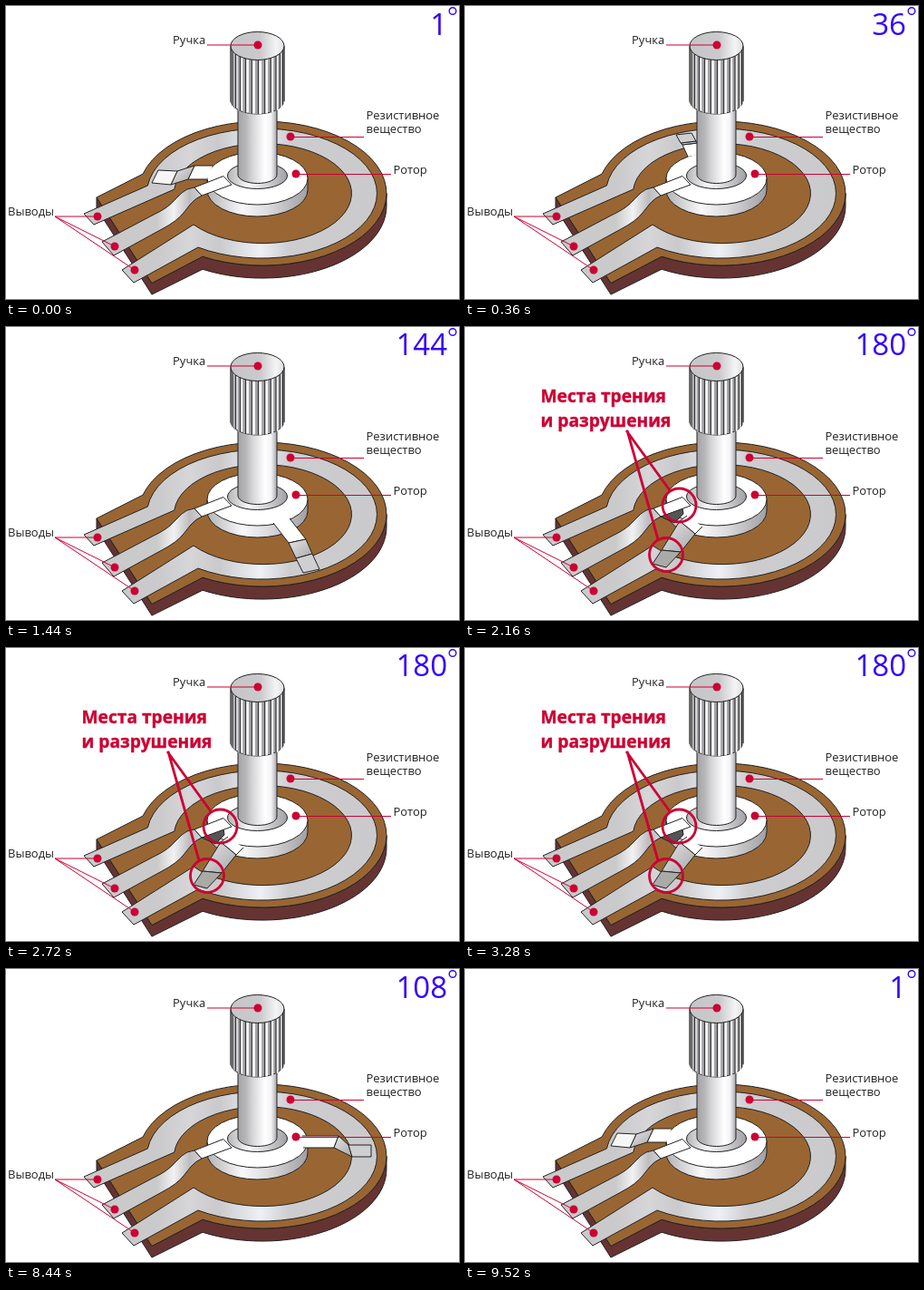
Recreate the animation shown at these times as an HTML page. Size 500 px wide and 323 px high, loop 9880 ms.

```html
<!DOCTYPE html>
<html lang="ru">
<head>
<meta charset="utf-8">
<style>
html, body { margin: 0; width: 100%; height: 100%; overflow: hidden; background: #fff; }
svg { display: block; width: 500px; height: 323px; }
text { font-family: "Open Sans", "Noto Sans", sans-serif; }
.label { font-size: 13px; fill: #222; }
.ink { stroke: #222; stroke-width: 1; stroke-linejoin: round; }
.lead { stroke: #cc0033; stroke-width: 1; fill: none; }
.dots { fill: #cc0033; }
.warn { stroke: #cc0033; stroke-width: 2.8; fill: none; }
.alert { font-size: 19.2px; font-weight: 700; fill: #cc0033; stroke: #cc0033; stroke-width: .4; }
</style>
</head>
<body>
<svg viewBox="0 0 500 323">
  <defs>
    <linearGradient id="track" gradientUnits="userSpaceOnUse" x1="86" x2="410">
      <stop offset="0" stop-color="#cacaca"/><stop offset=".25" stop-color="#cacacc"/>
      <stop offset=".36" stop-color="#d6d6d9"/><stop offset=".46" stop-color="#cacacc"/>
      <stop offset=".6" stop-color="#eef0f6"/><stop offset=".7" stop-color="#cdcdd0"/>
      <stop offset="1" stop-color="#cacacc"/>
    </linearGradient>
    <linearGradient id="shaft">
      <stop offset="0" stop-color="#a4a4a7"/><stop offset=".2" stop-color="#b6b6b9"/>
      <stop offset=".35" stop-color="#d2d2d5"/><stop offset=".55" stop-color="#ececee"/>
      <stop offset=".7" stop-color="#fff"/><stop offset=".85" stop-color="#f4f4f6"/>
      <stop offset="1" stop-color="#a8a8ac"/>
    </linearGradient>
    <linearGradient id="rim">
      <stop offset="0" stop-color="#b4b4b6"/><stop offset=".35" stop-color="#f8f8fa"/>
      <stop offset=".6" stop-color="#dcdcde"/><stop offset="1" stop-color="#a0a0a4"/>
    </linearGradient>
    <linearGradient id="cap">
      <stop offset="0" stop-color="#c6c6c9"/><stop offset=".55" stop-color="#cacacd"/>
      <stop offset=".85" stop-color="#f4f4f6"/><stop offset="1" stop-color="#e0e0e2"/>
    </linearGradient>
    <linearGradient id="slope" x2="1" y2="1">
      <stop offset="0" stop-color="#e6e6e8"/><stop offset="1" stop-color="#a8a8ab"/>
    </linearGradient>
    <linearGradient id="wiper">
      <stop offset="0" stop-color="#cacaca"/><stop offset=".55" stop-color="#cacaca"/>
      <stop offset=".72" stop-color="#f2f2f4"/><stop offset=".88" stop-color="#bcbcbf"/>
      <stop offset="1" stop-color="#d4d4d6"/>
    </linearGradient>
  </defs>

  <g class="ink">
    <path fill="#663333" d="M100,211 L161,305.5 L217,276.2 A137,79.5 0 0 0 420,206.5 V220.5 A137,79.5 0 0 1 217,290.2 L161,318 L100,223Z"/>
    <path fill="#996633" d="M100,211 L151,185.2 A137,79.5 0 1 1 217,276.2 L161,305.5Z"/>
    <path fill="url(#track)" d="M86,229 L156.4,198 A127,71.5 0 1 1 212,266 L141,305 L128,291 L207,241 A98,55 0 1 0 185.8,202 L97,241Z"/>
    <path fill="url(#rim)" d="M222,190 V203 A55.5,29 0 0 0 333,203 V190Z"/>
    <ellipse cx="277.5" cy="190" rx="55.5" ry="29" fill="#fff"/>
  </g>
  <g id="arm" class="ink">
    <path fill="#fff"/><path fill="url(#slope)"/><path/>
  </g>
  <g class="ink">
    <path fill="url(#wiper)" d="M106,260 L163,230 Q178,223 185,215 L194,206 Q199,201 208,200 L216,209 Q209,212 204,218 L196,228 Q189,237 172,246 L119,275Z"/>
    <path id="wear" fill="#555" d="M216,209 L240,199 L241,206 L231,216Z"/>
    <path fill="#fff" d="M208,200 L240,187.5 L249,197 L216,209Z"/>
    <ellipse cx="277.5" cy="187" rx="33" ry="14.5" fill="url(#rim)"/>
    <path fill="url(#shaft)" d="M256,110 V186 A21.5,9.5 0 0 0 299,186 V110Z"/>
    <path fill="url(#rim)" d="M248,44 V104 A29.5,15 0 0 0 307,104 V44Z"/>
  </g>
  <g id="flutes" fill="none"></g>
  <ellipse class="ink" cx="277.5" cy="44" rx="29.5" ry="15.5" fill="url(#cap)"/>

  <path class="lead" d="M222,43 H278 M314,144.5 H395 M320,185.5 H425 M54,232 H101 M54,232 L120,265 M54,232 L142,291"/>
  <g id="dots" class="dots"></g>
  <g class="label">
    <text x="184" y="42">Ручка</text>
    <text x="397.5" y="125">Резистивное</text>
    <text x="397.5" y="140">вещество</text>
    <text x="427.5" y="185">Ротор</text>
    <text x="2" y="231">Выводы</text>
  </g>
  <g id="alert">
    <path class="warn" d="M178,114 L226,180 M179,114 L213,234"/>
    <circle class="warn" cx="236.5" cy="196.5" r="18.5"/>
    <circle class="warn" cx="222" cy="251" r="18.5"/>
    <text class="alert" x="83.5" y="83">Места трения</text>
    <text class="alert" x="83.5" y="109.5">и разрушения</text>
  </g>
  <text id="angle" x="487" text-anchor="end" font-size="33" fill="#3300ff"></text>
  <circle cx="493" cy="5.5" r="3.8" fill="none" stroke="#3300ff" stroke-width="1.4"/>
</svg>
<script>
const LOOP = 9880, STEP = 360, BLINK = 280, LAST = 5;
const NS = "http://www.w3.org/2000/svg";
const $ = id => document.getElementById(id);

// Each arm: four points along one edge, then four along the other.
const arms = [
  "228,176 208,176 189,182 168,181 222,191 201,191 182,197 161,195",
  "246,166 240,153 238,151 233,142 264,163 257,151 255,149 250,140",
  "297,164 312,151 323,154 337,145 313,169 327,156 339,159 354,150",
  "327,184 367,184 378,194 403,194 328,197 362,197 382,207 403,207",
  "313,211 331,234 338,250 346,267 295,216 312,238 320,255 328,271",
  "245,208 237,214 217,246 207,261 262,220 254,228 238,248 222,265"
].map(s => s.split(" "));

function add(parent, tag, attrs) {
  const el = document.createElementNS(NS, tag);
  for (const k in attrs) el.setAttribute(k, attrs[k]);
  return parent.appendChild(el);
}

function drawDots() {
  for (const [cx, cy] of [[278, 43], [314, 144], [320, 185], [101, 232], [120, 265], [142, 291]])
    add($("dots"), "circle", { cx, cy, r: 4.5 });
}

function drawFlutes() {
  for (let deg = -82; deg < 90; deg += 14) {
    const a = deg * Math.PI / 180, c = Math.cos(a), x = 277.5 + 29.5 * Math.sin(a);
    const rib = (dx, stroke, w) => add($("flutes"), "path", {
      d: `M${x + dx * c},${44 + 15 * c}V${104 + 15 * c}`, stroke, "stroke-width": w
    });
    rib(-2, "#a2a2a6", 2.6 * c + .4);
    rib(2, "#fafafa", 2.6 * c + .2);
    rib(0, "#333", 1.2);
  }
}

function drawArm(pose, worn) {
  const p = arms[pose];
  [...$("arm").children].forEach((el, i) => {
    const close = i ? "Z" : "";
    el.setAttribute("d", `M${p[i]}L${p[i + 1]}L${p[i + 5]}L${p[i + 4]}${close}`);
  });
  $("arm").lastElementChild.setAttribute("fill", worn ? "#aaaaa6" : pose ? "#cfcfd1" : "#f6f6f6");
}

function stateAt(t) {
  if (t < 2160) return [Math.floor(t / STEP), false];
  if (t < 3280) return [LAST, Math.floor((t - 2160) / BLINK) % 2 === 0];
  if (t < 7720) return [LAST, true];
  return [LAST - Math.floor((t - 7720) / STEP), false];
}

let shown = "";
function render(t) {
  const [pose, warn] = stateAt(t);
  const key = pose + "/" + warn;
  if (key === shown) return;
  shown = key;
  drawArm(pose, warn);
  $("angle").textContent = Math.max(1, pose * 36);
  $("angle").setAttribute("y", pose < 4 ? 32 : 30.5);
  for (const id of ["alert", "wear"]) $(id).style.display = warn ? "" : "none";
}

function tick() {
  render(performance.now() % LOOP);
  requestAnimationFrame(tick);
}

drawDots();
drawFlutes();
tick();
</script>
</body>
</html>
```
